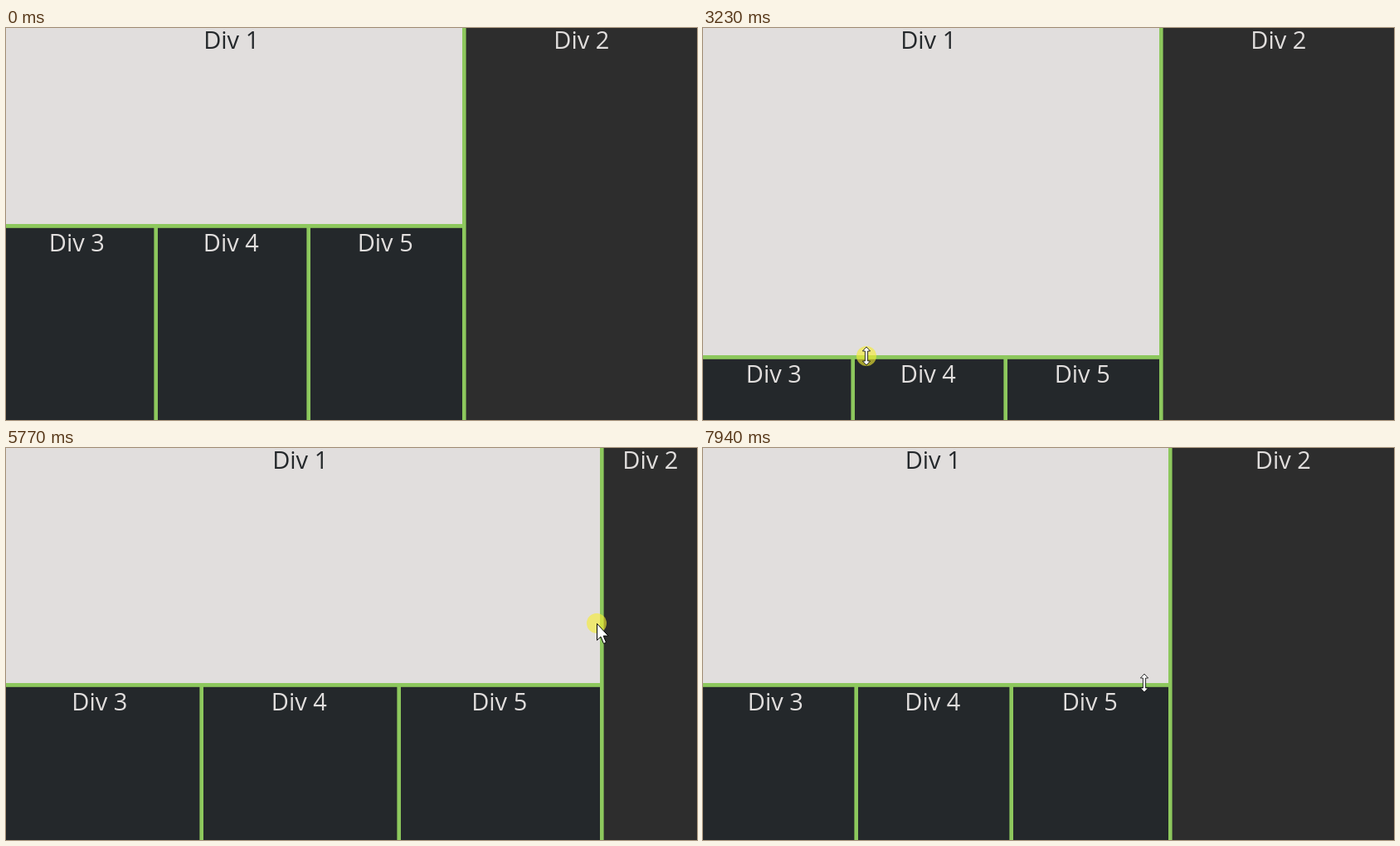
An HTML page for the animation above (7990 ms loop, 833 by 472 pixels).

```html
<!DOCTYPE html>
<html lang="en">
<head>
<meta charset="utf-8">
<title>Resizable panes</title>
<style>
  html, body { margin: 0; width: 100%; height: 100%; overflow: hidden; background: #2d2d2d; }
  svg { display: block; width: 100%; height: 100%; }
  text { font: 29px "Open Sans", "Noto Sans", sans-serif; text-anchor: middle; }
</style>
</head>
<body>
<svg id="stage" viewBox="0 0 833 472"></svg>
<script>
const LOOP = 7990, WIDTH = 833, HEIGHT = 472, BAR = 4.6;
const LIGHT = '#e1dedd', DARK = '#24282b', GREY = '#2d2d2d', GREEN = '#8dc85d';
const stage = document.getElementById('stage');

function add(tag, attrs) {
  const el = document.createElementNS(stage.namespaceURI, tag);
  stage.appendChild(el);
  return set(el, attrs);
}

function set(el, attrs) {
  for (const key in attrs) el.setAttribute(key, attrs[key]);
  return el;
}

// Monotone cubic through [time, value] pairs: smooth, without overshoot.
function track(keys) {
  const grade = i => (keys[i + 1][1] - keys[i][1]) / (keys[i + 1][0] - keys[i][0]);
  const slopes = keys.map((_, i) => {
    if (i === 0 || i === keys.length - 1) return 0;
    const a = grade(i - 1), b = grade(i);
    return a * b <= 0 ? 0 : 2 * a * b / (a + b);
  });
  return t => {
    if (t <= keys[0][0]) return keys[0][1];
    const i = keys.findIndex(k => k[0] > t) - 1;
    if (i < 0) return keys[keys.length - 1][1];
    const [t0, v0] = keys[i], [t1, v1] = keys[i + 1];
    const d = t1 - t0, u = (t - t0) / d, w = 1 - u;
    return v0 * w * w * (1 + 2 * u) + v1 * u * u * (3 - 2 * u)
      + d * u * w * (slopes[i] * w - slopes[i + 1] * u);
  };
}

const splitY = track([[1690, 236], [2260, 49], [2430, 44], [2510, 44], [3230, 394],
  [3330, 394], [3800, 84], [3850, 83], [4110, 150], [4500, 283]]);
const splitX = track([[4990, 550], [5500, 755], [5600, 755], [5770, 716], [6390, 181],
  [6560, 158], [6720, 158], [7430, 269], [7800, 561]]);
const mouseX = track([[50, 676], [300, 640], [500, 565], [830, 437], [1400, 230], [1640, 208],
  [2260, 182], [2520, 180], [3230, 197], [3800, 250], [4110, 262], [4560, 270],
  [4900, 548], [4990, 548], [5490, 757], [5590, 757], [5770, 712], [6390, 171], [6540, 154],
  [6720, 156], [7430, 274], [7790, 564], [7830, 563], [7940, 532]]);
const mouseY = track([[50, 440], [300, 355], [500, 270], [830, 205], [1000, 203], [1640, 237],
  [1690, 237], [2260, 49], [2420, 44], [2500, 44], [3230, 395], [3310, 395], [3800, 81],
  [3840, 81], [4110, 153], [4480, 285], [4560, 285], [4900, 207], [4990, 207], [6390, 216],
  [7430, 224], [7800, 250], [7940, 283]]);

const rect = fill => add('rect', { x: 0, y: 0, width: WIDTH, height: HEIGHT, fill });

function label(n, fill) {
  const el = add('text', { fill });
  const lines = [0, 1].map(() => {
    const span = document.createElementNS(stage.namespaceURI, 'tspan');
    el.appendChild(span);
    return span;
  });
  return (left, right, top, nudge) => {
    const wrap = right - left < 66;
    const x = (left + right) / 2 + nudge + (wrap ? 1.7 : 0);
    lines[0].textContent = wrap ? 'Div' : 'Div ' + n;
    lines[1].textContent = wrap ? n : '';
    lines.forEach((span, i) => set(span, { x, y: top + 25 + i * 35 }));
  };
}

rect(GREY);
const upper = rect(LIGHT);
const lower = rect(DARK);
const barY = rect(GREEN);
const bars = [1, 2, 3].map(() => set(rect(GREEN), { width: BAR }));
const labels = [1, 2, 3, 4, 5].map(n => label(n, n === 1 ? DARK : LIGHT));
const halo = add('circle', { r: 12, fill: '#f5ee32', 'fill-opacity': 0.62 });
const ink = { fill: '#fff', stroke: '#000', 'stroke-width': 1 };
const arrow = add('path', { d: 'M.5.5V20.5L5 16.3 8.5 24.5 11.5 23.2 8.2 15.2H14Z', ...ink });
const resize = add('path', {
  d: 'M0-11L4.6-6H1.6V6H4.6L0 11-4.6 6H-1.6V-6H-4.6Z', ...ink, 'stroke-width': 0.8
});

const within = (t, a, b) => t >= a && t < b;
const show = (el, on) => set(el, { visibility: on ? 'visible' : 'hidden' });

function draw(t) {
  const x = Math.round(splitX(t)), y = Math.round(splitY(t));
  const edge = x + BAR, top = y + 5;
  const cuts = [1, 2].map(i => Math.round(edge * 0.3305 * i));

  set(upper, { width: x, height: y });
  set(lower, { y: top, width: x, height: HEIGHT - top });
  set(barY, { y, width: x, height: 4.8 });
  cuts.forEach((cut, i) => set(bars[i], { x: cut - BAR, y, height: HEIGHT - y }));
  set(bars[2], { x });

  labels[0](0, x, 0, -3.3);
  labels[1](edge, WIDTH, 0, 0);
  labels[2](0, cuts[0] - BAR, top + 3, -3.8);
  labels[3](cuts[0], cuts[1] - BAR, top + 3, -1.3);
  labels[4](cuts[1], x, top + 3, -1.3);

  const mx = mouseX(t), my = mouseY(t);
  const dragY = within(t, 1660, 4540), dragX = within(t, 5000, 7810);
  const overBar = mx < x - 2 && Math.abs(my - y - 2) < 5;
  const visible = t >= 50, sizing = dragY || (overBar && !dragX);
  const transform = `translate(${Math.round(mx)} ${Math.round(my)})`;
  [halo, arrow, resize].forEach(el => set(el, { transform }));
  show(halo, dragY || dragX);
  show(arrow, visible && !sizing);
  show(resize, visible && sizing);
}

const start = performance.now();
function tick(now) {
  draw(Math.max(0, now - start) % LOOP);
  requestAnimationFrame(tick);
}
draw(0);
requestAnimationFrame(tick);
</script>
</body>
</html>
```
